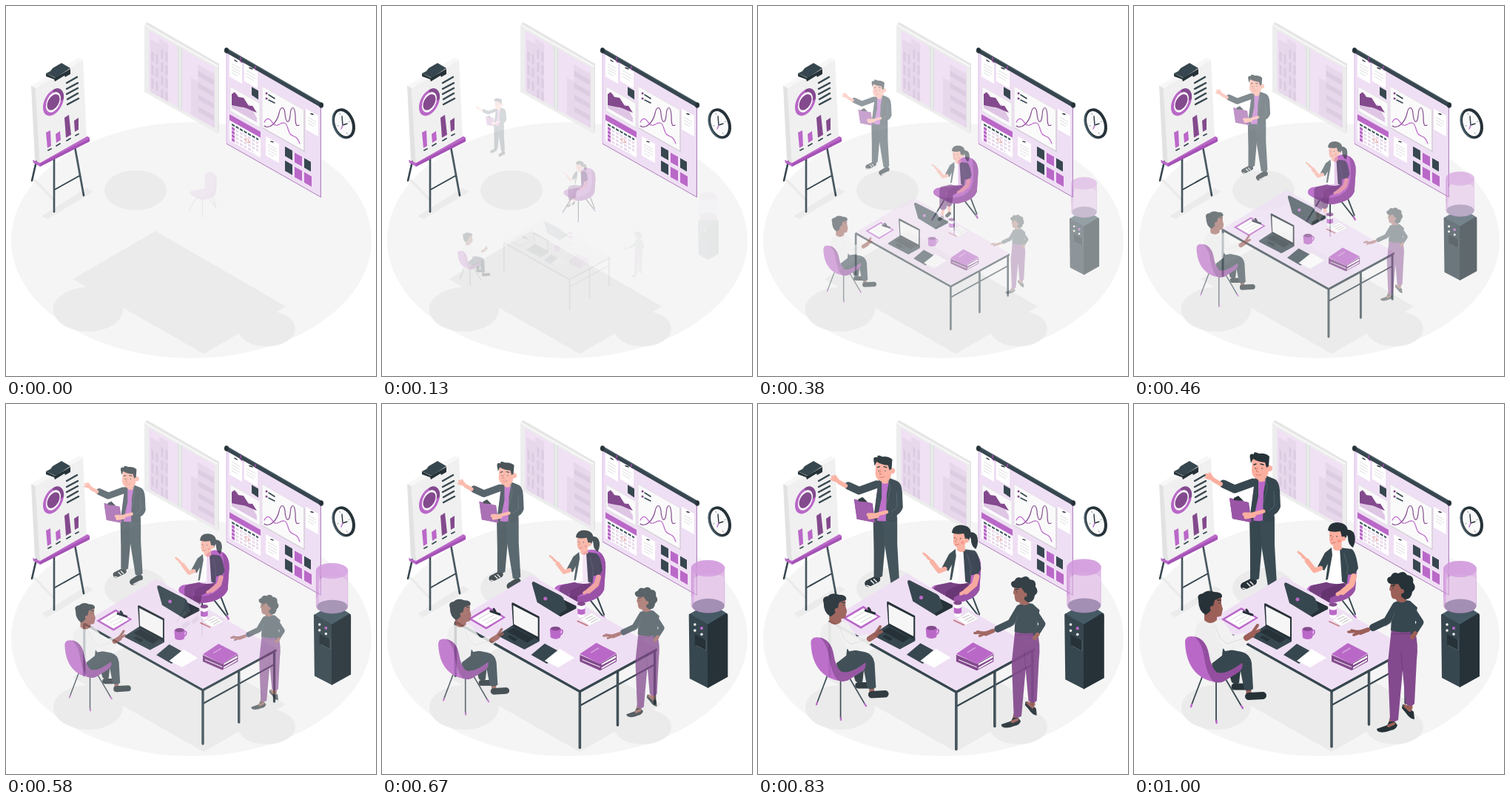
Write an HTML page that moves like this. It is 500x500 px and loops after 1040 ms.

```html
<!DOCTYPE html>
<html lang="en">
<head>
<meta charset="utf-8">
<title>Office meeting</title>
<style>
html, body { margin: 0; width: 100%; height: 100%; overflow: hidden; background: #fff }
svg { display: block; width: 100%; height: 100% }
.k { fill: #263238 } .d { fill: #37474f } .g { fill: #455a64 }
.p { fill: #ba68c8 } .q { fill: #834a8d } .l { fill: #efdff4 }
.w { fill: #fff } .e { fill: #ebebeb } .s { fill: #fbaf9f } .b { fill: #9c6058 }
.line { fill: none; stroke-linecap: round; stroke-linejoin: round }
.dark { stroke: #37474f } .ink { stroke: #263238 } .plum { stroke: #834a8d }
.purple { stroke: #ba68c8 } .skin { stroke: #fbaf9f } .brown { stroke: #9c6058 } .pale { stroke: #d8d8d8 }
</style>
</head>
<body>
<svg viewBox="0 0 500 500">
<!-- floor and shadows -->
<ellipse cx="250.5" cy="316.5" rx="243.5" ry="159.5" fill="#f5f5f5"/>
<g class="e">
  <ellipse cx="175" cy="249" rx="42" ry="27"/>
  <ellipse cx="111" cy="410" rx="47" ry="30"/>
  <ellipse cx="352" cy="436" rx="39" ry="24"/>
  <path d="M202 304 378 406 267 470 90 369Z"/>
  <path d="M48 284 56 288 118 251 109 246Z"/>
  <path d="M36 235 64 264 67 262 40 234Z"/>
</g>

<!-- easel -->
<g class="line dark" stroke-width="2.600">
  <path d="M41 210 35 236M93 190 105 256M65 206V278"/>
  <path d="M66 248 100 229" stroke-width="2"/>
  <path d="M65 210V277M94 194 104 252" stroke="#5f7179" stroke-width=".8"/>
</g>
<path d="M34 108 98 70 104 73 40 111Z" fill="#f7f7f7"/>
<path d="M34 108 40 111 46 212 39 208Z" fill="#e2e2e2"/>
<path d="M40 111 104 73 109 179 46 212Z" fill="#f0f0f0"/>
<path class="p" d="M36 208 46 212 110 176 113 178V183L46 217 37 212Z"/>
<path d="M46 213 113 179V183L46 217Z" fill="#a453b4"/>
<path class="k" d="M54 91 66 97 87 85V92L80 96 79 94 66 102 65 99 54 95Z"/>
<path class="d" d="M54 91 60 88 63 84 75 77 87 84 67 97Z"/>
<g transform="matrix(1 -.57 .05 1 64 130)">
  <ellipse rx="12" ry="14.500" fill="#fafafa" stroke="#ba68c8" stroke-width="4"/>
  <path class="line plum" d="M2-14.500A12 14.500 0 0 1 12 2" stroke-width="4"/>
  <ellipse class="q" rx="8.500" ry="9.500"/>
</g>
<path class="line dark" stroke-width="2.500" d="M82 104 96 96M82 112 97 104M82 119 97 111M83 126 97 118M83 133 98 125"/>
<path class="p" d="M54 171 60 168 61 189 56 192ZM67 173 73 169 74 181 68 185Z"/>
<path class="q" d="M79 151 85 147 88 174 81 178ZM92 155 98 151 98 167 93 170Z"/>
<path class="line dark" stroke-width="1.800" d="M57 195 61 193M68 189 73 186M82 182 87 179M94 175 98 173"/>

<!-- window -->
<path d="M187 25 191 22 288 78V170L284 172Z" fill="#e6e6e6"/>
<g transform="matrix(1 .567 0 1 187 25)">
  <path d="M0 0H99V91H0Z" fill="#ededed"/>
  <path d="M0 0H99" stroke="#fafafa" stroke-width="2"/>
  <path d="M6 4H45V86H6ZM51 4H95V86H51Z" fill="#f0e1f4"/>
  <path d="M8 15H20V8H32V86H8ZM63 36H72V13H95V86H63Z" fill="#e7d8ec"/>
  <path d="M11 31V86M17 31V86M24 20V86M30 20V86" stroke="#dccbe2" stroke-width="3" stroke-dasharray="13 5"/>
  <path d="M73 25H94M73 41H94M73 57H94M73 73H94" stroke="#dccde2" stroke-width="7"/>
  <path d="M46 3V87M50 3V87" stroke="#d9dfdb" stroke-width="1.500"/>
</g>

<!-- pin board -->
<g transform="matrix(1 .567 0 1 298 64)">
  <path class="l" d="M0 0H127V122H0Z" stroke="#cfa3da" stroke-width=".6"/>
  <path d="M127.500 0V122L0 122" fill="none" stroke="#b489bf"/>
  <path class="w" d="M4-1H21V29H4ZM24-2H42V24H24ZM107 14H124V42H107ZM53 82H71V108H53Z"/>
  <path d="M7 10H18M7 14H18M7 18H18M7 22H15M27 8H39M27 12H39M27 16H37M110 24H121M110 28H121M110 32H118M56 91H68M56 95H68M56 99H68M56 103H64" stroke="#ddd" stroke-width="1"/>
  <path class="line ink" d="M11 3 14 3M31 2 35 1M114 17 117 16M60 85 63 84" stroke-width="1.500"/>
  <path class="line purple" d="M18-2 20 0M38-3 40-1" stroke-width="3"/>
  <path class="d" d="M34 26H43V38L34 37Z"/>
  <path d="M5 42H45V75H5Z" fill="#fafafa" stroke="#ddd" stroke-width=".7"/>
  <path d="M7 58 14 46 22 62 31 51 41 64V70H7Z" fill="#dfc6e5"/>
  <path class="q" d="M7 51 11 46 16 50 23 47 30 54 35 51 41 57 26 59 7 66Z"/>
  <path class="w" d="M4 82H46V115H4Z"/>
  <path class="p" d="M4 80H46V88H4Z"/>
  <path d="M7 92H43" stroke="#455a64" stroke-width="2.500" stroke-dasharray="4 1.500"/>
  <path d="M7 97H43M7 102H43M7 107H43M7 112H36" stroke="#e6d7e9" stroke-width="3" stroke-dasharray="3.800 1.700"/>
  <path d="M9 95V114" stroke="#ba68c8" stroke-width="4" stroke-dasharray="4 1"/>
  <circle cx="28" cy="102" r="2.500" fill="none" stroke="#ee9a90" stroke-width=".8"/>
  <path d="M48 17H105V73H48Z" fill="#fafafa" stroke="#e3dde5"/>
  <path d="M105 17V73H48" fill="none" stroke="#d5cfd8" stroke-width="1.500"/>
  <path class="d" d="M79 81H89V94H79ZM105 82H114V95H105ZM79 100H89V114H79Z"/>
  <path class="p" d="M92 82H102V95H92ZM92 101H102V115H92ZM105 101H115V115H105Z"/>
</g>
<path class="line plum" d="M352 118h.1M352 125h.1" stroke-width="3"/>
<path class="line dark" d="M355 120 363 125M355 127 363 131" stroke-width="1.600"/>
<path class="line plum" stroke-width="1.200" d="M349 162C356 167 366 158 369 145C371 135 376 135 377 145C378 159 383 160 384 148C385 134 390 134 391 148C391 160 392 163 396 161"/>
<path class="line purple" stroke-width="1.200" d="M349 157C353 150 356 151 361 159C366 165 370 157 376 158C381 159 380 167 384 173C389 178 393 174 397 186"/>
<path class="line dark" d="M298 60 426 134" stroke-width="6"/>
<path class="line" d="M299 58 426 131" stroke="#5a6c74" stroke-width="1"/>
<path class="line ink" d="M298 59V61M426 133V135" stroke-width="5.500"/>
<path class="line plum" d="M317 70V72M337 82V84" stroke-width="2.500"/>

<!-- clock -->
<g transform="rotate(-20 456 159)">
  <ellipse class="g" cx="455" cy="159" rx="13.500" ry="21"/>
  <ellipse class="k" cx="457.500" cy="159" rx="13.500" ry="21"/>
  <ellipse cx="456" cy="159" rx="11" ry="17.500" fill="#fafafa"/>
  <path class="line" stroke="#aaa" d="M456 144V146M456 172V174M447 159H449M463 159H465"/>
</g>
<path class="line ink" d="M454 149 455 161 461 159" stroke-width="1.400"/>
<path class="line purple" d="M455 161 453 166" stroke-width="1.400"/>

<g id="presenter">
  <path class="line ink" d="M177 258 188 251" stroke-width="11"/>
  <path class="line" d="M178 262 190 256" stroke="#eee" stroke-width="2"/>
  <path class="line ink" d="M149 246 161 240" stroke-width="10"/>
  <path class="line" d="M147 249 153 251 168 243M153 242 157 246M157 240 161 244" stroke="#eee" stroke-width="1.600"/>
  <path class="d" d="M156 152H178L173 190 169 236Q163 240 157 236L157 200Z"/>
  <path d="M170 154 190 152 190 190 193 244Q188 249 181 246L172 190Z" fill="#3b4c54"/>
  <path class="p" d="M163 101 180 98 182 155Q170 161 157 156Z"/>
  <path class="s" d="M168 95 180 93 180 102Q173 108 167 103Z"/>
  <path class="d" d="M164 99 160 127 156 157 161 158 168 125 168 102Z"/>
  <path class="line dark" d="M161 106 136 115 121 108" stroke-width="11" stroke-linejoin="miter"/>
  <path class="line skin" d="M115 107 106 102 98 95M106 102 97 99M107 101 102 94" stroke-width="3.200"/>
  <path class="line skin" d="M117 108 108 103" stroke-width="6"/>
  <path class="d" d="M179 97 189 101Q196 103 197 117L198 139Q195 147 190 149L188 158Q181 162 174 157L175 120Z"/>
  <path class="line" d="M177 100 180 112 174 138M189 118 190 138 182 145" stroke="#56666e" stroke-width=".8"/>
  <path class="q" d="M129 127 155 133 159 160 133 155Z"/>
  <path d="M129 127 154 133 158 160 133 155Z" fill="#9b55a7"/>
  <path class="k" d="M135 127 141 124 148 131 135 130Z"/>
  <path class="line skin" d="M175 145 160 149 149 149M162 151 151 153" stroke-width="5"/>
  <path class="s" d="M160 73Q168 66 180 75L182 89Q181 102 171 103Q160 101 159 91Z"/>
  <circle class="s" cx="183" cy="87" r="4"/>
  <path class="k" d="M157 74Q155 66 162 68Q161 63 169 67Q178 66 183 71L182 84 179 86 177 79Q166 78 161 74L158 80Z"/>
  <path class="line ink" d="M162 82 165 81M171 81 175 82M164 87h.1M173 87h.1" stroke-width="1.400"/>
  <path class="line" d="M167 86 165 91 168 92M165 95Q168 98 172 95" stroke="#d4776d"/>
</g>

<g id="armchair">
  <path class="line dark" d="M252 260 233 291M265 266V312M278 261 299 288M287 253 299 284" stroke-width="2"/>
  <path class="line purple" d="M234 289 232 293M265 310V313M298 286 300 290" stroke-width="2.500"/>
  <path class="p" d="M271 204Q280 195 292 201Q301 206 301 222L299 251Q294 263 276 267Q263 271 252 264L235 255Q231 249 239 245L271 240Z"/>
  <path d="M292 201Q302 208 301 222L299 251Q294 263 276 267Q263 271 252 264L236 256Q270 266 286 251Q298 239 292 201Z" fill="#9a52a7"/>
</g>

<g id="listener">
  <path class="line skin" d="M245 286 242 304M256 282 257 297" stroke-width="6"/>
  <path class="line ink" d="M242 309 236 313M257 301 252 306" stroke-width="7"/>
  <path class="line" d="M279 244 244 252 244 286" stroke="#744080" stroke-width="15"/>
  <path class="line" d="M279 248 259 258 256 280" stroke="#653570" stroke-width="13"/>
  <path class="w" d="M263 197 281 193 286 241Q272 246 258 240Z"/>
  <path class="d" d="M267 194 258 201 248 220 257 225 262 216 259 238 262 237 268 204Z"/>
  <path class="line skin" d="M252 222 244 225 234 212" stroke-width="6.500"/>
  <path class="line skin" d="M234 211 225 202M234 211 222 200M235 211 228 207" stroke-width="3"/>
  <path class="d" d="M278 194 294 196Q300 199 303 222L299 229 289 231 288 243 281 240Z"/>
  <path class="line" d="M284 202 289 221 288 231" stroke="#5a6a72" stroke-width=".8"/>
  <path class="line skin" d="M297 233 294 244 282 254" stroke-width="8"/>
  <path class="line skin" d="M282 253 275 257" stroke-width="5"/>
  <path class="k" d="M286 171Q292 168 297 174Q301 183 296 194Q289 190 289 180Z"/>
  <path class="s" d="M270 185 280 183 281 196Q273 201 269 195Z"/>
  <path class="s" d="M264 170 280 168 283 182Q279 194 270 192Q263 189 264 180Z"/>
  <path class="k" d="M262 171Q263 160 275 160Q290 161 289 174L286 182 281 180 279 172Q268 174 262 171Z"/>
  <circle class="s" cx="283" cy="182" r="3"/>
  <path class="line ink" d="M266 178h.1M274 179h.1" stroke-width="1.400"/>
  <path class="line" d="M269 179 267 184M267 188 272 187" stroke="#d4776d"/>
  <circle cx="277" cy="185" r="2" fill="#f58e84"/>
</g>

<g id="cooler">
  <path class="g" d="M416 284Q429 276 441 270Q456 276 467 284L440 299Z"/>
  <path class="d" d="M415 285Q416 282 420 286L441 298V383L416 370Z"/>
  <path class="k" d="M440 298 463 284Q467 282 467 286V368L440 383Z"/>
  <path class="k" d="M423 311 438 319V334L423 325Z"/>
  <path d="M425 326 438 333V318" fill="none" stroke="#5c6c74" stroke-width=".8"/>
  <path class="line" d="M423 298h.1M423 306h.1M432 311h.1" stroke="#f3f3f3" stroke-width="3.500"/>
  <path class="line purple" d="M432 303h.1" stroke-width="4"/>
  <path d="M418 223A22.500 11 0 0 1 463 223V272A22.500 11 0 0 1 418 272Z" fill="#ba68c8" opacity=".45"/>
  <path d="M422 238A20 8 0 0 1 462 238V273A20 9 0 0 1 422 273Z" fill="#fff" opacity=".3"/>
  <ellipse cx="440.500" cy="223" rx="22.500" ry="11" fill="#d49edf" opacity=".8"/>
  <ellipse cx="441" cy="273" rx="21.500" ry="9.500" fill="#a38fb3"/>
  <path class="line" d="M419 226V260" stroke="#d49add" stroke-width="1.500"/>
</g>

<g id="table">
  <g class="line dark" stroke-width="3.400">
    <path d="M101 296V367M367 336V404M317.500 362V433M267 390V463"/>
    <path d="M267 407 367 352" stroke-width="2.200"/>
    <path d="M267 392V462M318 364V432" stroke="#5d6e76" stroke-width=".8"/>
  </g>
  <path class="d" d="M101 293 267 386 370 330V334L267 390 101 297Z"/>
  <path class="l" d="M202 232.500 370 330 267 386 101 293Z"/>
  <path class="d" d="M203 244Q203 240 207 242L242 260Q245 262 246 266L262 274V277L241 288 210 269Z"/>
  <path class="k" d="M246 266 262 274V277L241 288 239 285 250 278Z"/>
  <circle class="p" cx="221" cy="264" r="2.500"/>
  <path class="p" d="M118 291 145 275 168 289 142 305Z"/>
  <path class="w" d="M123 291 145 278 164 289 142 302Z"/>
  <path class="line pale" d="M132 291 146 283M137 294 152 286M142 297 156 289"/>
  <path class="line ink" d="M148 281 160 285M152 278 154 281" stroke-width="3"/>
  <path class="d" d="M158 312 178 299 213 318V321L193 332 158 314Z"/>
  <path class="k" d="M170 308 179 303 206 317 197 323ZM170 315 174 313 184 318 180 321Z"/>
  <path class="k" d="M176 271Q176 268 179 270L213 288V320L178 301Z"/>
  <path d="M178 273 211 290V315L179 298Z" fill="#f6f6f6"/>
  <path class="line purple" d="M241 306Q246 305 243 311L239 314" stroke-width="1.800"/>
  <path class="p" d="M227 304 242 304 241 316Q235 320 228 316Z"/>
  <ellipse class="q" cx="234.500" cy="304" rx="6.500" ry="2.800"/>
  <path class="w" d="M264 272H274L273 288Q269 291 265 288Z"/>
  <path class="p" d="M264 277Q269 280 274 277V284Q269 287 264 284Z"/>
  <ellipse class="q" cx="269" cy="271" rx="5.500" ry="2.800"/>
  <path class="w" d="M268 292 283 283 296 292 280 300Z" stroke="#ddd" stroke-width=".6"/>
  <path class="line" stroke="#aaa" stroke-width=".8" d="M275 291 284 287M278 294 288 289M282 296 291 291"/>
  <path class="line" d="M264 294 277 300" stroke="#c87f88" stroke-width="1.800"/>
  <path class="d" d="M202 339 220 324 242 336 223 351Z"/>
  <path class="w" d="M220 347 240 331 260 343 238 356Z"/>
  <path class="q" d="M267 339 294 351 316 338V348L294 360 267 348Z"/>
  <path class="w" d="M296 351 315 340V343L296 353ZM296 356 315 345V347L296 358ZM270 345 294 355V356L270 346Z"/>
  <path class="p" d="M267 338 289 323 316 337 294 351Z"/>
  <path class="line" d="M282 336 292 330" stroke="#d5a3de" stroke-width="1.500"/>
</g>

<g id="sitter">
  <path class="line ink" d="M136 382 149 382" stroke-width="9"/>
  <path d="M124 350 145 350 142 377Q137 380 132 376Z" fill="#2e3c43"/>
  <path class="line brown" d="M155 386V391" stroke-width="7"/>
  <path class="line ink" d="M155 395 174 394" stroke-width="10"/>
  <path class="d" d="M104 338 120 330 146 335Q157 338 159 350L161 385Q155 389 149 386L144 361 118 369 106 360Z"/>
  <path d="M84 300Q90 291 103 291L121 295 132 322 120 331 119 340 97 357 80 325Z" fill="#eee"/>
  <path d="M121 294 109 290 111 313 123 334 146 330 157 320 149 309 134 313Z" fill="#f1f1f1"/>
  <path d="M110 300 116 316 126 324 150 316" fill="none" stroke="#dedede"/>
  <path class="line brown" d="M154 315 163 307M160 309 167 299M163 309 169 306" stroke-width="4"/>
  <path class="line brown" d="M152 316 160 311" stroke-width="8"/>
  <path class="b" d="M95 279 112 281 112 292Q103 300 95 292Z"/>
  <path class="b" d="M102 263 118 260 118 270 120 277 118 286Q110 291 101 281Z"/>
  <path class="k" d="M87 265Q84 257 93 256Q99 250 109 254Q120 254 119 261L109 265 107 273 103 280 97 285Q87 280 87 265Z"/>
  <circle class="b" cx="106" cy="276" r="3.200"/>
  <path class="line ink" d="M115 269h.1M113 265 117 265" stroke-width="1.400"/>
  <path class="line dark" d="M92 369 78 406M111 376V429M124 372 145 408" stroke-width="1.800"/>
  <path class="line purple" d="M78 406 77 409M111.500 428V431M145 408 147 411" stroke-width="2.400"/>
  <path class="p" d="M69 322Q69 313 79 314Q95 317 99 335Q103 356 112 363Q124 367 146 350Q148 358 140 363L121 375Q106 378 91 369Q70 355 69 322Z"/>
  <path d="M81 314Q97 317 101 337Q104 356 112 363Q124 367 146 350Q148 358 140 363L121 375Q114 378 107 375Q98 364 95 344Q92 322 81 314Z" fill="#934e9f"/>
</g>

<g id="stander">
  <path class="line brown" d="M349 425 347 433M372 402 373 410" stroke-width="7"/>
  <path class="k" d="M363 406 368 407 378 416 379 426Q373 426 367 417L362 411ZM328 439 342 434 345 429 352 429 356 434Q354 440 347 441Q335 446 329 442Z"/>
  <path class="line brown" d="M366 408 373 414M344 435 351 432" stroke-width="4"/>
  <path class="q" d="M348 303 379 304Q385 324 382 346L379 405Q374 411 367 405L363 360 357 427Q351 431 346 427L343 350Z"/>
  <path class="line" d="M361 335 363 360M348 311 379 310" stroke="#6d3a77" stroke-width=".8"/>
  <path class="line dark" d="M374 275 387 295 378 309" stroke-width="9" stroke-linejoin="miter"/>
  <path class="line brown" d="M380 310 376 315" stroke-width="6"/>
  <path class="d" d="M350 269Q360 263 373 266L383 275 380 290 380 306Q364 311 347 306L348 288Z"/>
  <path class="line dark" d="M353 274 342 293 323 302" stroke-width="10"/>
  <path class="line" d="M352 282 348 294 340 300" stroke="#52636b" stroke-width=".8"/>
  <path class="line brown" d="M317 304 303 308 294 306M305 309 297 312M307 307 290 308" stroke-width="3.600"/>
  <path class="line brown" d="M316 305 306 309" stroke-width="6"/>
  <path class="b" d="M356 255 369 256 368 266Q360 271 354 265Z"/>
  <path class="b" d="M347 242 363 243 364 256Q359 266 350 263Q347 261 347 253L345 251Z"/>
  <path class="k" d="M344 242Q339 235 347 233Q350 226 357 229Q365 224 369 231Q379 232 377 241Q383 249 376 254Q375 264 366 264L361 260 362 251 357 243Q349 245 344 242Z"/>
  <circle class="b" cx="362" cy="253" r="3"/>
  <path class="line ink" d="M350 249h.1M348 246 352 245" stroke-width="1.400"/>
</g>
</svg>
<script>
const LOOP = 1040, TRAVEL = 1000;

// Cubic Bezier easing with overshoot, solved by bisection.
function overshoot(x) {
  if (x >= 1) return 1;
  const curve = (s, a, b) => 3 * (1 - s) * s * ((1 - s) * a + s * b) + s ** 3;
  let lo = 0, hi = 1;
  for (let i = 0; i < 24; i++) {
    const mid = (lo + hi) / 2;
    if (curve(mid, .36, .5) < x) lo = mid; else hi = mid;
  }
  return curve(lo, -.01, 1.38);
}
const pop = t => overshoot(t * 1.06);
const early = t => overshoot(t + .15);
const easeOut = t => 1 - (1 - t) ** 1.6;
const smooth = t => t * t * (3 - 2 * t);

// id, origin, starting scale, easing
const parts = [
  ['presenter', 148, 164, .25, easeOut],
  ['armchair', 266, 254, .5, early],
  ['listener', 261.6, 242, .25, easeOut],
  ['cooler', 441, 297, .5, pop],
  ['table', 238, 348.5, .5, pop],
  ['sitter', 124.5, 342, .25, easeOut],
  ['stander', 340, 335.5, .25, smooth]
].map(([id, ...rest]) => [document.getElementById(id), ...rest]);

function draw(now) {
  const t = Math.min(1, now % LOOP / TRAVEL);
  for (const [el, x, y, from, ease] of parts) {
    const p = ease(t), k = from + (1 - from) * p;
    el.setAttribute('transform', `translate(${x} ${y}) scale(${k}) translate(${-x} ${-y})`);
    el.setAttribute('opacity', Math.max(0, Math.min(1, p)));
  }
}
const start = performance.now();
function tick() {
  draw(performance.now() - start);
  requestAnimationFrame(tick);
}
draw(0);
requestAnimationFrame(tick);
</script>
</body>
</html>
```
